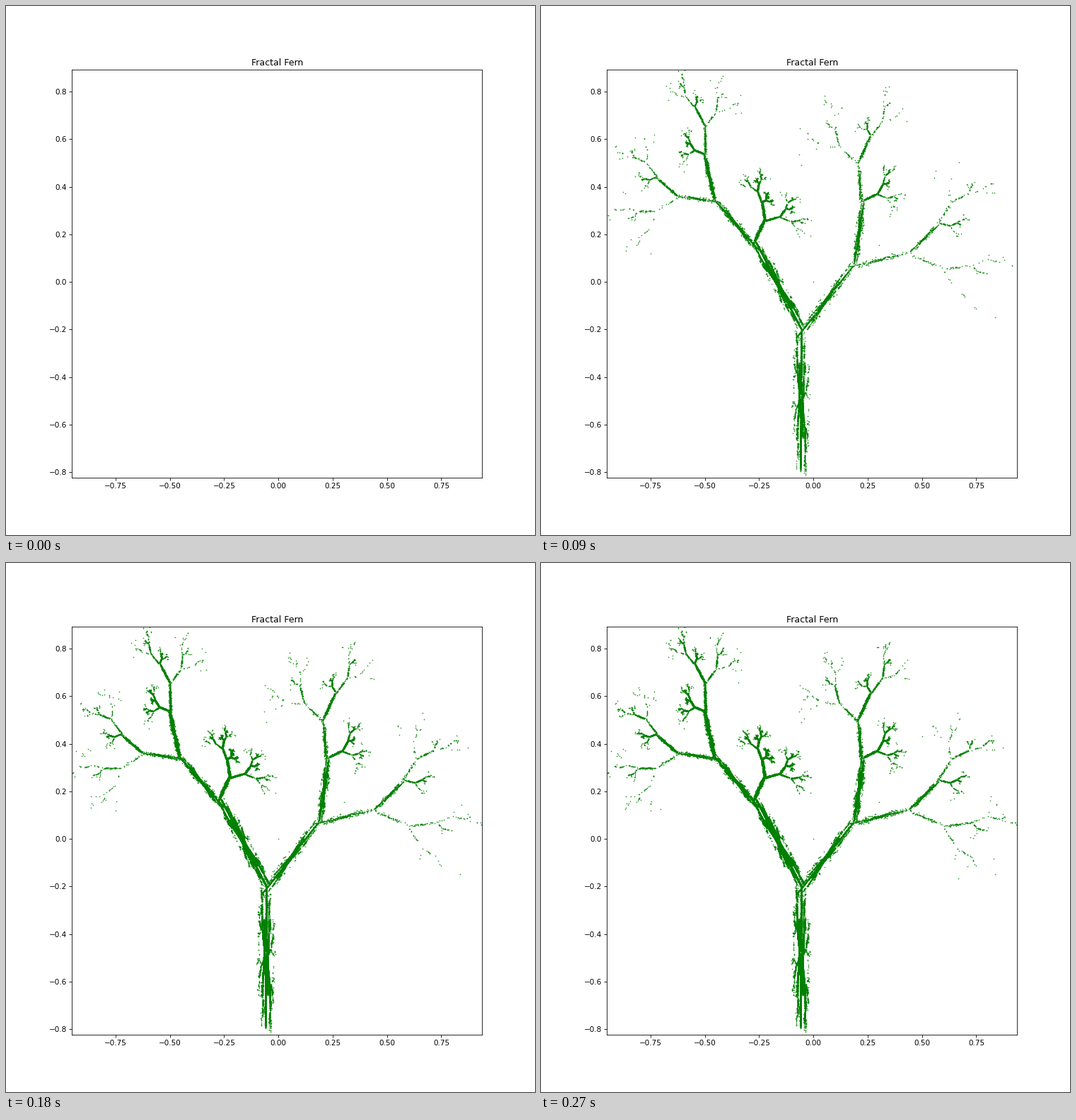
Write a matplotlib script that moves like this. It is 748 px wide and 748 px high and loops after 0.3 s.

```python
import random

import numpy as np
import matplotlib.pyplot as plt
from matplotlib.animation import FuncAnimation

FRAMES = 10
INTERVAL = 30
POINTS_PER_FRAME = 10000

# Key points of the tree
HEIGHT = 1.64
BASE = np.array([-0.060, -0.795])
FORK = np.array([-0.0557, -0.1993])
KNEE = np.array([-0.265, 0.168])


def direction(degrees):
    angle = np.radians(degrees)
    return np.array([np.cos(angle), np.sin(angle)])


def affine(x_axis, y_axis, anchor, image):
    """Coefficients of the affine map that sends anchor to image."""
    matrix = np.column_stack([x_axis, y_axis])
    shift = np.asarray(image) - matrix @ anchor
    return tuple(float(v) for v in (*matrix.ravel(), *shift))


def limb(fork, turn, width, height, lean=0):
    """A smaller, turned copy of the tree; a negative width mirrors it."""
    return affine(width * direction(turn), height * direction(turn + 90 + lean),
                  FORK, fork)


def stem(start, end, girth=0.075):
    """The whole tree squashed into a thin strand from start to end."""
    along = end - start
    across = np.array([along[1], -along[0]])
    return affine(girth * across, along / HEIGHT, BASE, start)


MAPS = [
    limb((-0.453, 0.342), 43.5, -0.457, 0.478),
    limb((-0.225, 0.2587), -28.5, 0.218, 0.168),
    limb((0.1853, 0.0714), -33.8, 0.662, 0.678, lean=-6.6),
    stem(BASE, FORK),
    stem(FORK, BASE),
    stem(FORK, KNEE),
    stem(KNEE, FORK),
]


def chaos_game(count, seed=7):
    """Follow one point through randomly chosen maps, starting at the origin."""
    rng = random.Random(seed)
    x = y = 0.0
    points = [(x, y)]
    while len(points) < count:
        a, b, c, d, e, f = rng.choice(MAPS)
        x, y = a * x + b * y + e, c * x + d * y + f
        points.append((x, y))
    return np.array(points)


points = chaos_game(POINTS_PER_FRAME * (FRAMES - 1))

fig, ax = plt.subplots(figsize=(10, 10), dpi=74.8)
fig.subplots_adjust(left=0.1245, right=0.9, bottom=0.1085, top=0.88)
ax.set_xlim(-0.9507, 0.938)
ax.set_ylim(-0.8233, 0.893)
ax.set_title("Fractal Fern")
dots, = ax.plot([], [], ".", color="green", markersize=1)


def update(frame):
    shown = points[:frame * POINTS_PER_FRAME]
    dots.set_data(shown[:, 0], shown[:, 1])
    return dots,


anim = FuncAnimation(fig, update, frames=FRAMES, interval=INTERVAL,
                     repeat=True, repeat_delay=0)
plt.show()
```
